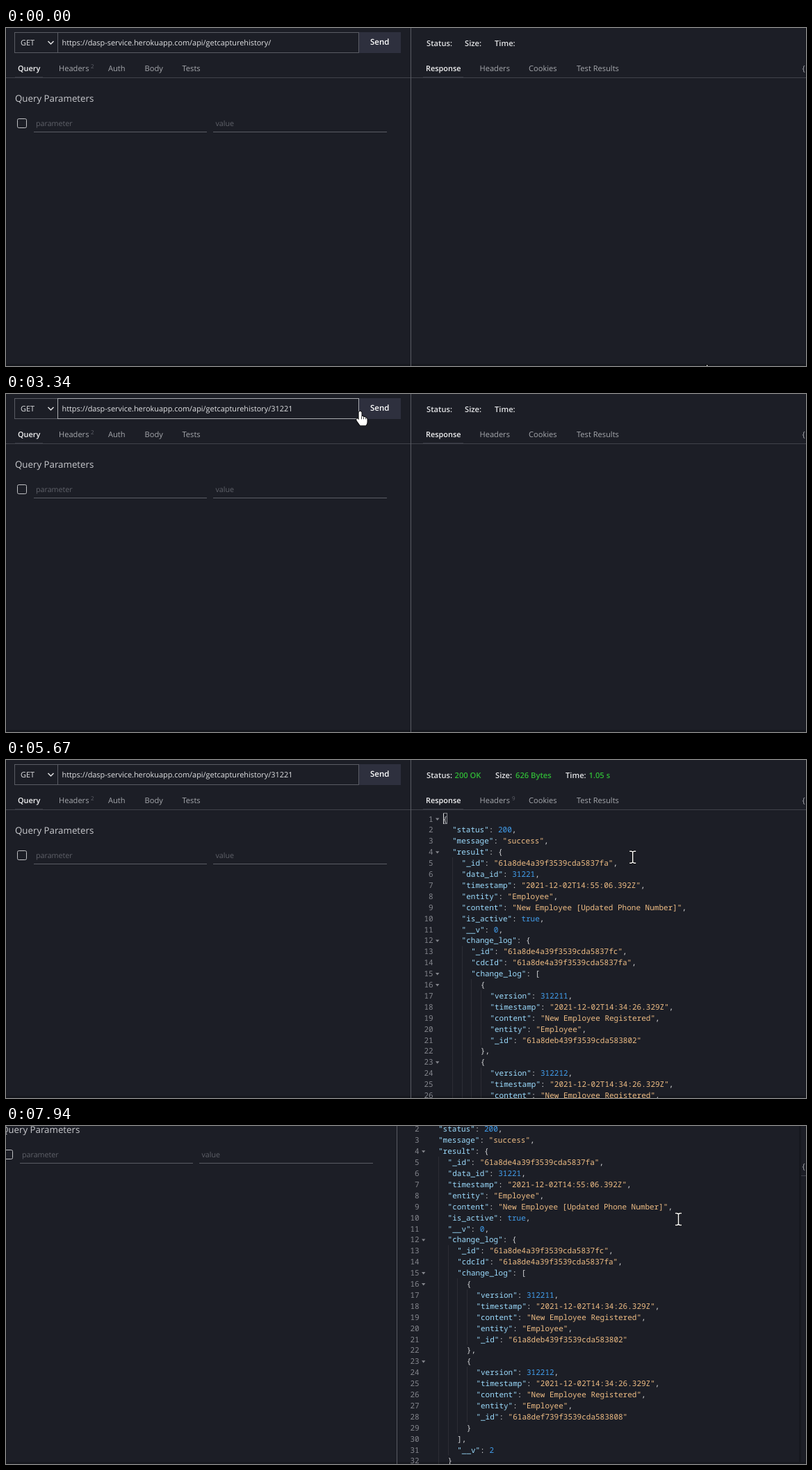
An HTML page with a canvas that plays this animation: 1151x486 px, repeating every 7990 ms.

```html
<!DOCTYPE html>
<html lang="en">
<head>
<meta charset="utf-8">
<title>API request</title>
<style>
html, body { margin: 0; width: 100%; height: 100%; overflow: hidden; background: #1c1e26; }
canvas { display: block; }
</style>
</head>
<body>
<canvas id="stage" width="1151" height="486"></canvas>
<script>
const W = 1151, H = 486, LOOP = 7990;
const ctx = document.getElementById('stage').getContext('2d');
ctx.textRendering = 'geometricPrecision';

const SANS = '"Open Sans", "Noto Sans", sans-serif';
const MONO = '"Noto Sans Mono", "DejaVu Sans Mono", monospace';
const BG = '#1c1e26', EDGE = '#16181e', LINE = '#5a5c64';
const LIGHT = '#e2e3e5', GRAY = '#a6a8ad', DIM = '#5f6169', GREEN = '#30b836';

const URL_TEXT = 'https://dasp-service.herokuapp.com/api/getcapturehistory/';
const KEYS = [1910, 2190, 2270, 2520, 2600];
const FOCUS = 780, CLICK = 3540, DONE = 4830;

const entry = (version, id) => `      {
        "version": ${version},
        "timestamp": "2021-12-02T14:34:26.329Z",
        "content": "New Employee Registered",
        "entity": "Employee",
        "_id": "${id}"
      }`;
const CODE = `{
  "status": 200,
  "message": "success",
  "result": {
    "_id": "61a8de4a39f3539cda5837fa",
    "data_id": 31221,
    "timestamp": "2021-12-02T14:55:06.392Z",
    "entity": "Employee",
    "content": "New Employee [Updated Phone Number]",
    "is_active": true,
    "__v": 0,
    "change_log": {
      "_id": "61a8de4a39f3539cda5837fc",
      "cdcId": "61a8de4a39f3539cda5837fa",
      "change_log": [
${entry(312211, '61a8deb439f3539cda583802').replace(/^/gm, '  ')},
${entry(312212, '61a8def739f3539cda583808').replace(/^/gm, '  ')}
      ],
      "__v": 2
    }
  }
}`.split('\n');

// Pointer paths: [time, x, y]
const PATHS = [
  [[0, 1008, 484], [40, 1008, 484], [180, 830, 300], [330, 540, 70], [460, 418, -16],
   [610, 418, -14], [740, 411, 24], [2879, 411, 24], [2880, 411, 25], [3060, 411, 25],
   [3250, 470, 28], [3450, 557, 22], [5290, 557, 22], [5400, 650, 70], [5520, 800, 138],
   [5600, 880, 149], [5670, 901, 140], [5850, 932, 85], [6080, 952, -14]],
  [[7770, 947, -12], [7810, 949, 4], [7940, 967, 134], [LOOP, 967, 134]]
];

function text(s, x, y, color = GRAY, size = 11.1, weight = 400, family = SANS) {
  ctx.font = `${weight} ${size}px ${family}`;
  ctx.fillStyle = color;
  ctx.fillText(s, x, y);
}

function rect(x, y, w, h, color) {
  ctx.fillStyle = color;
  ctx.fillRect(x, y, w, h);
}

function frame(x, y, w, h, color) {
  ctx.strokeStyle = color;
  ctx.lineWidth = 1;
  ctx.strokeRect(x, y, w, h);
}

function tabs(list, active) {
  for (const [label, x] of list) {
    const on = label === active;
    text(label, x, 61.5, on ? '#f4f4f5' : GRAY, on ? 10.9 : 11.1, on ? 600 : 400);
  }
}

function requestPane(t) {
  const focused = t >= FOCUS && t < CLICK;
  frame(12.5, 6.5, 62, 29, LINE);
  frame(74.5, 6.5, 433, 29, focused ? '#a9abaf' : LINE);
  text('GET', 21, 25, LIGHT, 10.9);
  ctx.strokeStyle = LIGHT;
  ctx.lineWidth = 1.5;
  ctx.stroke(new Path2D('M60.5 19l4 4 4-4'));

  const url = URL_TEXT + '31221'.slice(0, KEYS.filter(k => k <= t).length);
  text(url, 80.5, 25, LIGHT, 10.9);
  const blink = t >= 1170 && t < 1680 || t >= 3130;
  if (focused && !blink) rect(Math.round(80.5 + ctx.measureText(url).width), 13, 1, 15, '#fff');

  const busy = t >= CLICK && t < DONE;
  rect(508, 6, 60, 30, busy ? '#b9b9b9' : '#2e303e');
  text('Send', 524, 24, '#fff', 11.5, 600);

  rect(13, 70, 40, 1, '#34363f');
  tabs([['Query', 17], ['Headers', 76], ['Auth', 147], ['Body', 199.5], ['Tests', 253.5]], 'Query');
  text('2', 122, 58, DIM, 8);

  text('Query Parameters', 13, 105.7, '#c9cace', 13.3);
  ctx.strokeStyle = '#c0c1c4';
  ctx.lineWidth = 1;
  ctx.beginPath();
  ctx.roundRect(16.5, 130.5, 13, 13, 2);
  ctx.stroke();
  text('parameter', 43, 141, DIM, 10.7);
  text('value', 301.5, 141, DIM, 10.7);
  rect(40, 149, 249, 1, LINE);
  rect(298, 149, 250, 1, LINE);
}

function codeLine(source, i) {
  const body = source.trimStart(), level = (source.length - body.length) / 2;
  const left = 628.4, step = 13.6, pitch = 6.6, y = 84.5 + i * 15.9;
  const num = String(i + 1);
  text(num, 614.7 - num.length * pitch, y + 4, '#84868d', 11, 400, MONO);
  if (/[{[]$/.test(body)) {
    ctx.fillStyle = '#84868d';
    ctx.fill(new Path2D(`M618 ${y - 1}h5.4l-2.7 3.4z`));
  }
  for (let k = 1; k < level; k++) rect(Math.round(left + k * step), y - 8, 1, 15.9, 'rgba(255,255,255,.07)');
  for (const m of body.matchAll(/"[^"]*"|\w+|[^"\w]+/g)) {
    const s = m[0], isKey = body[m.index + s.length] === ':';
    const color = s[0] === '"' ? (isKey ? '#9cdcfe' : '#f0be85') : /\w/.test(s) ? '#429fee' : '#d5d6d8';
    text(s, left + level * step + m.index * pitch, y + 4, color, 11, 400, MONO);
  }
}

function responsePane(t) {
  const done = t >= DONE;
  const label = (s, x, color = LIGHT) => text(s, x, 25.5, color, 11.2, 600);
  if (done) {
    label('Status:', 605);
    label('200 OK', 645.5, GREEN);
    label('Size:', 704);
    label('626 Bytes', 733, GREEN);
    label('Time:', 805);
    label('1.05 s', 838.5, GREEN);
    text('9', 728, 58, DIM, 8);
  } else if (t >= CLICK) {
    label('Processing, Please Wait...', 605);
    ctx.strokeStyle = '#363841';
    ctx.lineWidth = 3;
    ctx.beginPath();
    ctx.arc(873.5, 305, 13.3, 0, 7);
    ctx.stroke();
    text('Processing...', 842.5, 341.3, '#7f8188', 10.7);
  } else {
    label('Status:', 605);
    label('Size:', 660);
    label('Time:', 703);
  }
  rect(600, 70, 58, 1, '#34363f');
  tabs([['Response', 604], ['Headers', 681.5], ['Cookies', 752], ['Test Results', 821]], 'Response');
  text('{', 1145.5, 61.5);

  if (!done) return;
  CODE.forEach(codeLine);
  frame(629.5, 76.5, 5, 15, '#85878c');
  rect(629, 77, 1, 15, LIGHT);
}

function screen(t, dx, dy) {
  rect(0, 0, W, H, BG);
  rect(0, H - 3, W, 3, EDGE);
  rect(0, 0, 1, H, EDGE);
  rect(W - 1, 0, 1, H, EDGE);
  ctx.save();
  ctx.translate(dx, dy);
  rect(0, 71, W + 20, 1, '#41434b');
  rect(582, 0, 1, 600, LINE);
  requestPane(t);
  responsePane(t);
  ctx.restore();
}

function outlined(d, width) {
  const p = new Path2D(d);
  ctx.lineJoin = 'round';
  ctx.strokeStyle = '#000';
  ctx.lineWidth = width;
  ctx.stroke(p);
  return p;
}

function pointer(t) {
  const path = PATHS.find(p => t >= p[0][0] && t <= p[p.length - 1][0]);
  if (!path) return;
  const i = Math.max(1, path.findIndex(p => p[0] > t));
  const [t0, x0, y0] = path[i - 1], [t1, x1, y1] = path[i];
  const f = (t - t0) / (t1 - t0);
  const x = x0 + (x1 - x0) * f, y = y0 + (y1 - y0) * f;

  if (t >= 760 && t < 990 || t >= 3490 && t < 3670) {
    ctx.fillStyle = 'rgba(255,255,0,.5)';
    ctx.beginPath();
    ctx.arc(x - 1.5, y - 1, 12.5, 0, 7);
    ctx.fill();
  }

  const overUrl = x > 75 && x < 508 && y > 6 && y < 36;
  const overSend = x >= 508 && x < 568 && y > 6 && y < 36;
  const overCode = t >= DONE && x > 628 && (y > 72 || t > 6460);
  ctx.save();
  ctx.translate(x, y);
  if (overUrl || overCode) {
    const p = outlined('M-4 -8.5H-1.5L.5 -7.5L2.5 -8.5H5M.5 -7.5V7.5M-4 8.5H-1.5L.5 7.5L2.5 8.5H5', 3);
    ctx.strokeStyle = '#fff';
    ctx.lineWidth = 1.5;
    ctx.stroke(p);
  } else {
    const p = overSend
      ? outlined('M-2 1Q0 -2 2 1V7Q4 6 5 8Q7 7 8 9Q10 9 10 11V15Q10 18 8 20H0L-5 13Q-6 10 -4 10L-2 12Z', 1.6)
      : outlined('M0 0V16L4 12.5L6.5 18L9 17L6.5 11.5H11.5Z', 1.5);
    ctx.fillStyle = '#fff';
    ctx.fill(p);
    if (overSend) {
      ctx.lineWidth = .8;
      ctx.stroke(new Path2D('M2 7v4M5 8v3M8 9v2'));
    }
  }
  ctx.restore();
}

function draw(now) {
  const t = now % LOOP;
  screen(t, 0, 0);
  if (t >= 6460) {
    // The view jumps, leaving a strip at the right in place.
    ctx.save();
    ctx.beginPath();
    ctx.rect(0, 0, 1144, H);
    ctx.clip();
    screen(t, -20, t >= 7330 ? -96 : -90);
    rect(1141, 0, 3, H, EDGE);
    ctx.restore();
  }
  pointer(t);
}

const start = performance.now();
function tick() {
  draw(performance.now() - start);
  requestAnimationFrame(tick);
}
tick();
</script>
</body>
</html>
```
